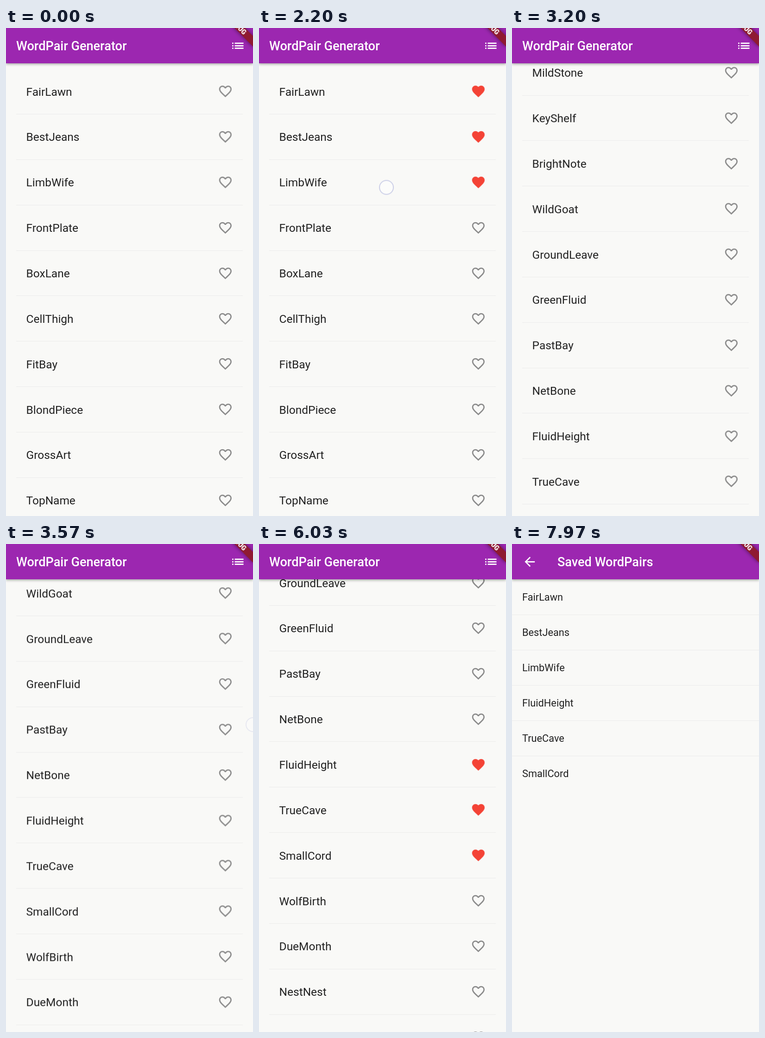
These frames come from a looping animation (533 px wide and 1051 px high, 8000 ms). An HTML page:

```html
<!DOCTYPE html>
<html lang="en">
<head>
<meta charset="utf-8">
<title>WordPair Generator</title>
<style>
html, body { margin: 0; width: 100%; height: 100%; overflow: hidden; background: #f9f9f7; }
body { position: relative; font-family: Roboto, sans-serif; color: #212121; }
div, svg { position: absolute; }
.page { left: 0; top: 0; width: 533px; height: 1051px; overflow: hidden; background: #f9f9f7; }
.bar {
  left: 0; top: 0; width: 533px; height: 76px; background: #9c27b0; color: #fff;
  box-shadow: 0 2px 4px rgba(0, 0, 0, .2), 0 3px 6px rgba(0, 0, 0, .14);
}
.bar div { font-size: 27.1px; font-weight: 500; line-height: 79px; white-space: nowrap; }
svg { width: 32.6px; height: 32.6px; fill: #fff; }
#list { left: 0; top: 0; width: 533px; }
.row { left: 22px; width: 489px; height: 76px; line-height: 77px; font-size: 24.46px; }
.row span { position: absolute; left: 21.6px; }
.row svg { left: 434.7px; top: 21.7px; }
.row::after, .saved::after { content: ""; position: absolute; left: 0; right: 0; height: 1px; background: #ebebeb; }
.row::after { top: 86.4px; }
.tile { inset: 0; overflow: hidden; }
.ripple { width: 560px; height: 560px; margin: -280px; border-radius: 50%; background: rgba(200, 200, 200, .4); }
.saved { left: 0; width: 511px; padding-left: 22px; height: 76px; line-height: 77px; font-size: 21.75px; }
.saved::after { top: 76px; }
.saved:last-of-type::after { display: none; }
.touch {
  left: -16px; top: -16px; width: 28px; height: 28px; border-radius: 50%;
  border: 2px solid rgba(100, 110, 190, .32); background: rgba(255, 255, 255, .5);
}
.banner {
  left: 446.1px; top: -12.2px; width: 108.6px; height: 16.3px; transform: rotate(45deg);
  background: #8f1a32; box-shadow: 0 0 8px rgba(0, 0, 0, .5);
  color: #fff; font-size: 13.86px; font-weight: 900; line-height: 16.3px; text-align: center;
}
</style>
</head>
<body>
<div class="page">
  <div id="list"></div>
  <div class="bar">
    <div style="left:22px">WordPair Generator</div>
    <svg viewBox="0 0 24 24" style="left:484px;top:22.2px"><path d="M3 11h2v2H3zM3 15h2v2H3zM3 7h2v2H3zM7 11h14v2H7zM7 15h14v2H7zM7 7h14v2H7z"/></svg>
  </div>
</div>
<div class="page" id="savedPage">
  <div class="bar">
    <div style="left:98px">Saved WordPairs</div>
    <svg viewBox="0 0 24 24" style="left:21.7px;top:22.2px"><path d="M20 11H7.83l5.59-5.59L12 4l-8 8 8 8 1.41-1.41L7.83 13H20z"/></svg>
  </div>
</div>
<div class="banner">DEBUG</div>
<div class="touch" id="touch"></div>
<script>
const LOOP = 8000, TOP = 98.6, TILE = 76, PITCH = 97.85;
const words = `FairLawn BestJeans LimbWife FrontPlate BoxLane CellThigh FitBay BlondPiece GrossArt TopName
  PinkRoad CalmSeat MouthForce ClerkHint SnowSkill TermGuy HealthDoubt CardPalm DamCook CleanFeel
  StrictPork TopTrait LeafBoard MildStone KeyShelf BrightNote WildGoat GroundLeave GreenFluid PastBay
  NetBone FluidHeight TrueCave SmallCord WolfBirth DueMonth NestNest PlainDesk`.split(/\s+/);

const HEART = 'M12 21.35l-1.45-1.32C5.4 15.36 2 12.28 2 8.5 2 5.42 4.42 3 7.5 3c1.74 0 3.41.81 4.5 2.09C13.09 3.81 14.76 3 16.5 3 19.58 3 22 5.42 22 8.5c0 3.78-3.4 6.86-8.55 11.54z';
const HOLE = 'M12.1 18.55l-.1.1-.1-.1C7.14 14.24 4 11.39 4 8.5 4 6.5 5.5 5 7.5 5c1.54 0 3.04.99 3.57 2.36h1.87C13.46 5.99 14.96 5 16.5 5c2 0 3.5 1.5 3.5 3.5 0 2.89-3.14 5.74-7.9 10.05z';

const $ = id => document.getElementById(id);

function add(parent, cls, html = '') {
  const el = document.createElement('div');
  el.className = cls;
  el.innerHTML = html;
  return parent.appendChild(el);
}

// Each step is [ms, style, easing towards the next step]
function play(el, steps) {
  const frames = steps.map(([ms, style, easing = 'step-end']) => ({ offset: ms / LOOP, easing, ...style }));
  frames.push({ ...steps[steps.length - 1][1], offset: 1 });
  el.animate(frames, { duration: LOOP, iterations: Infinity });
}

const show = opacity => ({ opacity });
const shiftY = px => ({ transform: `translateY(${px}px)` });
const finger = (x, y, opacity) => ({ transform: `translate(${x}px,${y}px)`, opacity });

const rows = words.map((word, i) => {
  const row = add($('list'), 'row', `<div class="tile"></div><span>${word}</span>
    <svg viewBox="0 0 24 24"><path fill="#8b8b8b" fill-rule="evenodd" d="${HEART}${HOLE}"/><path fill="#f44336" opacity="0" d="${HEART}"/></svg>`);
  row.style.top = TOP + i * PITCH + 'px';
  return row;
});

const touches = [[0, finger(0, 0, 0)]];
const scrolls = [[0, shiftY(0)]];
let scroll = 0, savedCount = 0;

function press(x, y, from, to) {
  touches.push([from, finger(x, y, 1)], [to, finger(x, y, 0)]);
}

function like(i, x, dy, ms, release) {
  const row = rows[i], [outline, heart] = row.querySelectorAll('path');
  play(outline, [[0, show(1)], [ms, show(0)]]);
  play(heart, [[0, show(0)], [ms, show(1)]]);

  const ripple = add(row.firstChild, 'ripple');
  ripple.style.left = x - 22 + 'px';
  ripple.style.top = TILE / 2 + dy + 'px';
  play(ripple, [
    [0, { transform: 'scale(0)', opacity: 0 }],
    [ms, { transform: 'scale(0)', opacity: 1 }, 'linear'],
    [ms + 230, { transform: 'scale(1)', opacity: 0 }],
  ]);

  press(x, TOP + i * PITCH + TILE / 2 + dy - scroll, ms - 20, release);
  add($('savedPage'), 'saved', words[i]).style.top = TILE * ++savedCount + 'px';
}

// Likes three rows downwards; the last touch rests until `end`
function likeThree(first, x, dy, start, gap, end) {
  for (let n = 0; n < 3; n++) {
    const ms = start + n * gap;
    like(first + n, x, dy, ms, n < 2 ? ms + 260 : end);
  }
}

function swipe(start, end, target) {
  const lift = start + 170;
  touches.push(
    [start, finger(388, 690.5, 1), 'linear'],
    [lift, finger(533, 389, .4), 'linear'],
    [lift + 60, finger(533, 389, 0)]);
  scrolls.push([start, shiftY(-scroll), 'cubic-bezier(.15,.5,.4,1)'], [end, shiftY(-target)]);
  scroll = target;
}

likeThree(0, 275, 11, 650, 600, 2500);
swipe(2500, 2930, 1219);
swipe(2930, 3400, 2416.3);
swipe(3400, 4100, 2695);
likeThree(31, 373, -11, 4290, 550, 5660);
press(509, 26, 5800, 5910);

play($('touch'), touches);
play($('list'), scrolls);

const OPEN = 6070, OPENED = OPEN + 300;
play($('savedPage'), [[0, show(0)], [OPEN, show(0), 'ease-in'], [OPENED, show(1)]]);
play($('savedPage'), [
  [0, shiftY(263)],
  [OPEN, shiftY(263), 'cubic-bezier(.4,0,.2,1)'],
  [OPENED, shiftY(0)],
]);
</script>
</body>
</html>
```
